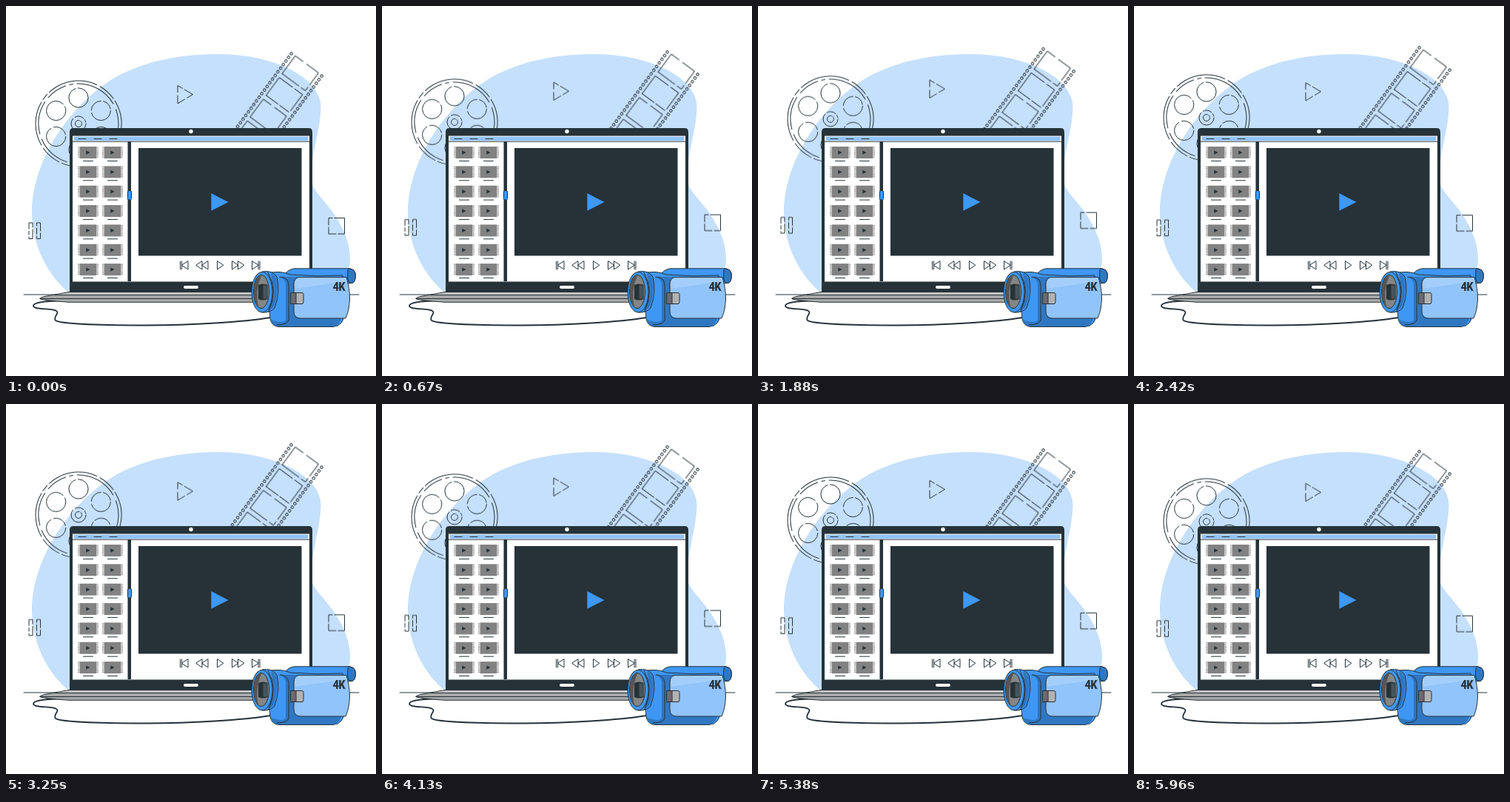
Animation, 500 px wide and 500 px high, one loop 6.04 s. Source, as an HTML page:

```html
<!DOCTYPE html>
<html lang="en">
<head>
<meta charset="utf-8">
<title>Video editing</title>
<style>
  html, body { margin: 0; width: 100%; height: 100%; overflow: hidden; background: #fff; }
  svg { display: block; width: 100%; height: 100%; }
  :root { --ink: #263238; --blue: #3f97f4; --deep: #3077c2; --pale: #91c4fa; --sky: #c5e0fc; }
  .line { fill: none; stroke: var(--ink); stroke-width: 1; stroke-linecap: round; stroke-linejoin: round; }
  .cable { stroke-width: 1.8; }
  .edge { stroke: var(--ink); stroke-width: 1; stroke-linejoin: round; }
  .ink { fill: var(--ink); }
  .blue { fill: var(--blue); }
  .deep { fill: var(--deep); }
  .pale { fill: var(--pale); }
  .slow { animation: drift 6040ms linear infinite; }
  .fast { animation: bob 6040ms linear infinite; }
  /* Periods of 6 s and 3 s; the last pose is held until the loop restarts */
  @keyframes drift {
    0% { transform: translateY(0); }
    49.669% { transform: translateY(-10px); }
    98.675%, 100% { transform: translateY(-.13px); }
  }
  @keyframes bob {
    0%, 49.669% { transform: translateY(0); }
    24.834%, 74.503% { transform: translateY(-10px); }
    98.675%, 100% { transform: translateY(-.27px); }
  }
  .label {
    font: 700 17px "Roboto Condensed", "Liberation Sans Narrow", Roboto, sans-serif;
    font-stretch: 75%; letter-spacing: -.8px;
  }
</style>
</head>
<body>
<svg viewBox="0 0 500 500">
  <path fill="var(--sky)" d="M86 388C58 366 35 325 35 278C35 213 83 134 150 95C190 74 235 65 288 65C355 65 418 92 425 130C428 157 413 195 412 232C412 249 431 262 444 282C458 304 465 322 465 342C465 352 462 360 455 370L400 390Z"/>

  <g id="reel" class="line slow">
    <circle cx="98" cy="159" r="58" pathLength="360" stroke-dasharray="60 4 9 4 68 5 24 4 100 5 40 4 28 5" transform="rotate(150 98 159)"/>
    <circle cx="98" cy="159" r="54" pathLength="360" stroke-dasharray="48 8 30 6 5 6 62 9 40 5 76 7 50 8" transform="rotate(165 98 159)"/>
    <circle cx="98" cy="159" r="10" pathLength="100" stroke-dasharray="62 5 20 4 6 3"/>
    <circle cx="98" cy="159" r="4.5" pathLength="100" stroke-dasharray="80 6 10 4"/>
  </g>

  <g class="slow"><g id="film" class="line" transform="translate(385.5 64.5) rotate(36.4)"/></g>

  <g class="line fast">
    <path d="M232 116.500V107.500L238.500 111.300M241.200 112.900L252.500 119.500L244.500 124.200M241.500 126L232 131.800V121"/>
    <path d="M31 301V293H36V299M36 302V314.500H31V312M31 309V304M41.500 297V293H46.500V304M46.500 307V314.500H41.500V311M41.500 308V300"/>
    <path d="M436 296V286.500H441M444 286.500H457.500V308H449M446 308H436V299"/>
  </g>

  <path class="line" d="M24 390H477"/>

  <path class="line cable" d="M88 398C60 398 37 400 37 405C37 411 62 408 68 412C73 415 63 420 67 425C74 430 140 431.500 190 431.500C250 431.500 320 427 358 421"/>

  <g id="laptop">
    <path class="edge" fill="#a8a8a8" d="M88 386L52 392.500Q46 394 45.500 395.500Q48 397.500 85 400.300H415Q452 397.500 455 395.500L414 386Z"/>
    <path fill="#c4c4c4" d="M88 387H412L440 390.500H66Z"/>
    <path class="line" d="M46 395.500H454M66 390.500H440"/>
    <path class="ink" d="M86 387V170Q86 165 91 165H409Q414 165 414 170V387Z"/>
    <circle cx="250" cy="169.500" r="2.700" fill="#fff"/>
    <path fill="#fff" d="M90 175.500H410V372.500H90Z"/>
    <path class="pale" d="M92 176.500H408V182H92Z"/>
    <path class="line" d="M90 183.200H410"/>
    <path class="line" d="M98 179.500H108M119 179.500H129M140 179.500H150"/>
    <path class="ink" d="M164.500 183H169V372H164.500Z"/>
    <rect class="blue edge" x="164.500" y="249.500" width="5" height="12.500" rx="1.500"/>
    <path class="ink" d="M179 192H399.500V337.500H179Z"/>
    <path class="blue" d="M277.300 253V276.800L300.500 265Z"/>
    <path class="line" d="M235.500 345V356M237.500 345V356M246 345V356L237.500 350.500ZM265 345V356L257 350.500ZM273 345V356L265 350.500ZM285.500 345V356L293.500 350.500ZM305.500 345V356L313.500 350.500ZM313.500 345V356L321.500 350.500ZM332.500 345V356L341 350.500ZM341 345V356M343 345V356"/>
    <rect x="240" y="378" width="20" height="4" rx="2" fill="#fff"/>
  </g>

  <g id="camera">
    <path class="blue edge" d="M374 367Q380 355.500 390 354.800H463Q472 355 472.500 364Q472 374 467 374.500H380Z"/>
    <path class="deep edge" d="M463 354.800Q472 355 472.500 364Q472 374 467 374.500Q461 374 461.500 364Q461.500 356 463 354.800Z"/>
    <path class="blue edge" d="M352 361Q372 357 384 363Q420 366 455 364L459 412Q456 433 442 433.500H368Q358 432 357 422L355 405Z"/>
    <path class="deep" d="M370 366H396V422H453Q450 432.500 442 433H368Q360 432 358 424Q376 430 378 424V375Q376 369 370 366Z"/>
    <path class="line" d="M370 366Q381 366 382 377V424Q381 431 366 431"/>
    <path class="pale edge" d="M396 366.500H460Q464.500 382 464.500 395Q464 411 459 422H397Q389 421 389 413V376Q389 367.500 396 366.500Z"/>
    <path fill="#b9dafb" d="M396 367.500H459.500L460.500 372L390 382V376Q390 368.500 396 367.500Z" opacity=".45"/>
    <path class="edge" fill="#6b6b6b" d="M384.500 387.500H393V402.500H384.500Z"/>
    <path class="edge" fill="#b2b2b2" d="M392 387.500H400Q402 387.500 402 389.500V400.500Q402 402.500 400 402.500H392Z"/>
    <text class="label ink" x="441.500" y="385">4K</text>

    <path class="blue edge" d="M346 359Q360 356.500 366 366Q371 386 363 408Q357 415 346 414Z"/>
    <path class="deep" d="M358 361Q364 363 365.500 369Q369 386 362 407Q358 411 353 412Q364 388 358 361Z"/>
    <path class="line" d="M354 360Q368 384 355 413"/>
    <ellipse class="blue edge" cx="346" cy="386.700" rx="14" ry="27.300"/>
    <ellipse class="edge" cx="345" cy="386" rx="10.500" ry="22.500" fill="#858585"/>
    <path fill="#555" d="M345 364Q335 367 335 386Q335 402 341 407Q336 386 345 364Z"/>
    <path class="ink" d="M341 377Q347 374 353 377V396Q347 399 341 396Z"/>
    <path class="edge" fill="#4b555a" d="M347 377H353V396H347Z"/>
  </g>
</svg>
<script>
  const add = (parent, tag, attrs) => {
    const el = document.createElementNS("http://www.w3.org/2000/svg", tag);
    for (const key in attrs) el.setAttribute(key, attrs[key]);
    return parent.appendChild(el);
  };
  const byId = id => document.getElementById(id);

  // Reel holes
  const gaps = ["70 4 26 0", "46 5 24 4 18 3", "60 4 30 6", "34 6 52 8", "66 5 25 4", "88 5 7 0"];
  gaps.forEach((dash, i) => {
    const a = i * Math.PI / 3 - Math.PI / 2;
    add(byId("reel"), "circle", {
      cx: 98 + 35 * Math.cos(a), cy: 159 + 35 * Math.sin(a), r: 13.1,
      pathLength: 100, "stroke-dasharray": dash
    });
  });

  // Film perforations and pictures
  const film = byId("film");
  for (let i = 0; i < 29; i++)
    for (const x of [0, 51])
      add(film, "rect", { x: x - 1.6, y: i * 6.1 - 1.6, width: 3.2, height: 3.2, rx: .6 });
  for (let i = 0; i < 5; i++) {
    const y = i * 36.4 - 1;
    add(film, "path", {
      d: `M6 ${y + 30}V${y}H45V${y + 30}H6`,
      pathLength: 138,
      "stroke-dasharray": i % 2 ? "52 4 40 4 15 3 20 0" : "43 6 40 4 13 4 28 0"
    });
  }

  // Clip list
  for (let row = 0; row < 7; row++)
    for (const x of [97, 130]) {
      const clip = add(byId("laptop"), "g", { transform: `translate(${x} ${190 + row * 26.35})` });
      add(clip, "path", { d: "M2.500 0H25.500V16H2.500Z", fill: "#828282" });
      add(clip, "path", {
        d: "M1 .5V16M27 .5V16", fill: "none", stroke: "#777",
        "stroke-width": 1.6, "stroke-dasharray": "1.1 1.1"
      });
      add(clip, "path", { d: "M11.300 5.300V10.700L16.500 8Z", class: "ink" });
      add(clip, "path", { d: "M7.500 19.400H20.500", class: "line" });
    }
</script>
</body>
</html>
```
